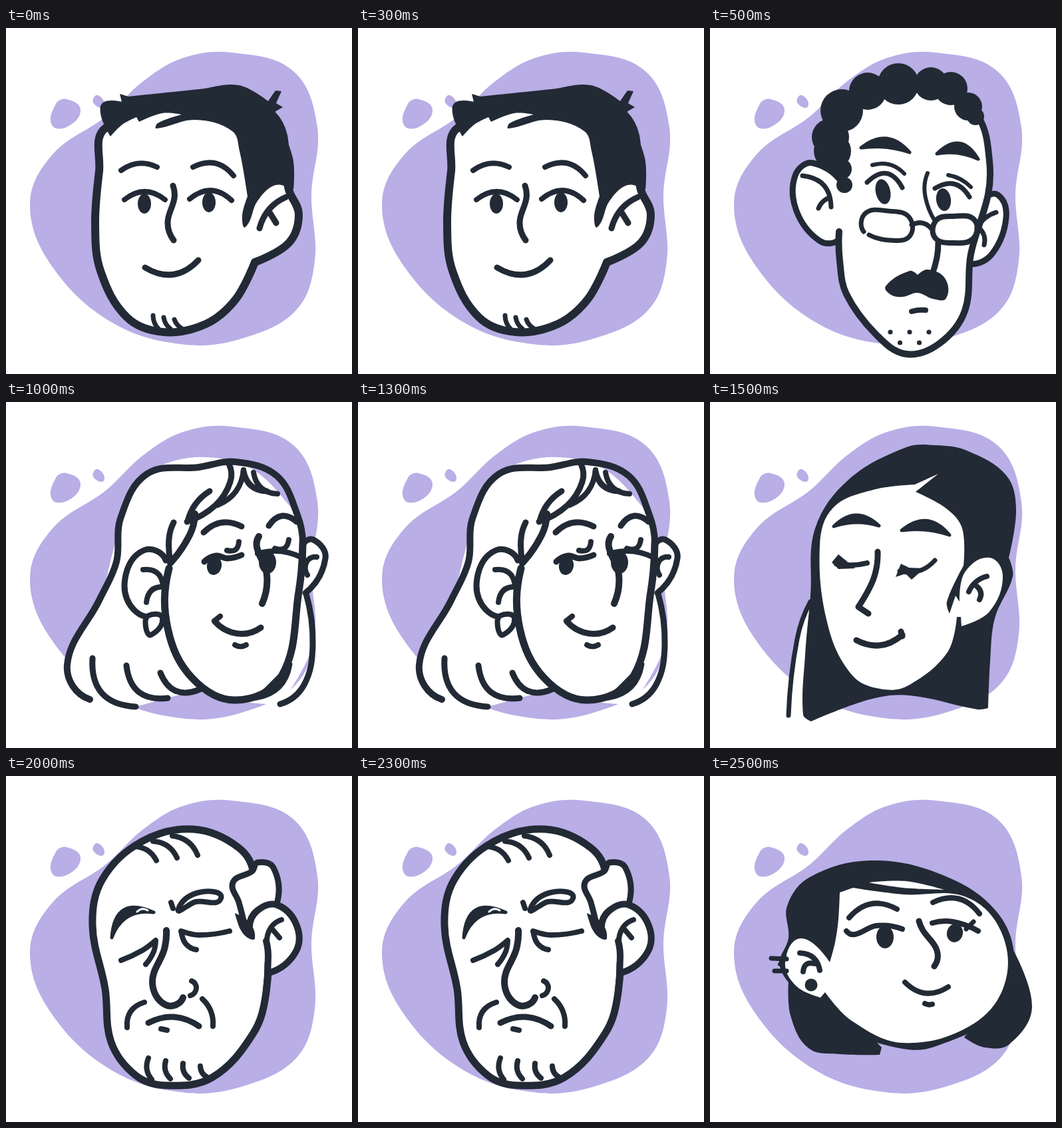
An HTML page for the animation above (3000 ms loop, 520 by 520 pixels).

```html
<!DOCTYPE html>
<html lang="en">
<head>
<meta charset="utf-8">
<title>Faces</title>
<style>
html, body { margin: 0; width: 100%; height: 100%; overflow: hidden; background: #fff; }
svg { display: block; width: 100%; height: 100%; }
</style>
</head>
<body>
<svg id="stage" viewBox="0 0 520 520" stroke-linecap="round" stroke-linejoin="round"></svg>
<script>
const INK = '#222a35', LILAC = '#b9aee6', WHITE = '#fff';
const STEP = 500;

// Smooth curve through key points; "!" marks a sharp corner.
function curve(text, closed) {
  const pts = text.split(' ').map(s => {
    const [x, y] = s.replace('!', '').split(',').map(Number);
    return { x, y, sharp: s.endsWith('!') };
  });
  const n = pts.length;
  const at = i => pts[(i + n) % n];
  const unit = (a, b) => {
    const d = Math.hypot(b.x - a.x, b.y - a.y) || 1;
    return { x: (b.x - a.x) / d, y: (b.y - a.y) / d };
  };
  const inner = i => unit(at(i - 1), at(i + 1));
  // Open ends mirror the neighbour's direction, which makes a round arc.
  const tangent = i => {
    if (pts[i].sharp) return { x: 0, y: 0 };
    if (closed || (i > 0 && i < n - 1)) return inner(i);
    const near = i ? i - 1 : 1, u = unit(at(Math.min(i, near)), at(Math.max(i, near)));
    if (n < 3 || pts[near].sharp) return u;
    const t = inner(near), k = 2 * (u.x * t.x + u.y * t.y);
    return { x: k * u.x - t.x, y: k * u.y - t.y };
  };
  let d = `M${pts[0].x} ${pts[0].y}`;
  for (let i = 0; i < (closed ? n : n - 1); i++) {
    const j = (i + 1) % n, p = pts[i], q = pts[j], s = tangent(i), t = tangent(j);
    const k = Math.hypot(q.x - p.x, q.y - p.y) * 0.36;
    d += `C${p.x + s.x * k} ${p.y + s.y * k} ${q.x - t.x * k} ${q.y - t.y * k} ${q.x} ${q.y}`;
  }
  return d + (closed ? 'Z' : '');
}

const path = (d, fill, width = 0, color = INK) =>
  `<path d="${d}" fill="${fill}" stroke="${width ? color : 'none'}" stroke-width="${width}"/>`;
const fill = (pts, color = INK) => path(curve(pts, true), color);
const line = (w, pts) => path(curve(pts), 'none', w);
const skin = (w, pts) => path(curve(pts), WHITE, w);
const ring = (w, pts) => path(curve(pts, true), WHITE, w);
const oval = (x, y, rx, ry = rx, turn = 0) =>
  `<ellipse cx="${x}" cy="${y}" rx="${rx}" ry="${ry}" transform="rotate(${turn} ${x} ${y})" fill="${INK}"/>`;
const repeat = (n, draw) => Array.from({ length: n }, (_, i) => draw(i)).join('');

// Control point of an arc whose height is bend times its chord.
const knee = (x1, y1, x2, y2, bend) =>
  `${(x1 + x2) / 2 + (y2 - y1) * bend * 2} ${(y1 + y2) / 2 - (x2 - x1) * bend * 2}`;
const arc = (w, x1, y1, x2, y2, bend = 0, color = INK) =>
  path(`M${x1} ${y1}Q${knee(x1, y1, x2, y2, bend)} ${x2} ${y2}`, 'none', w, color);
// Crescent between two arcs.
const brush = (x1, y1, x2, y2, top, low) =>
  path(`M${x1} ${y1}Q${knee(x1, y1, x2, y2, top)} ${x2} ${y2}Q${knee(x1, y1, x2, y2, low)} ${x1} ${y1}Z`, INK, 5);

const backdrop = [
  fill('340,37 432,65 468,150 459,250 464,350 437,423 360,465 270,476 160,443 69,358 36,265 70,190 150,133 205,81 266,45', LILAC),
  fill('91,107 112,123 93,148 69,146 75,114', LILAC),
  fill('138,101 147,118 131,112', LILAC)
];

const shortHair = [
  ring(12, '150,150 140,215 134,295 142,365 182,435 237,457 300,445 345,408 374,352! 425,323 440,280 425,243 400,130 290,110'),
  fill('146,112 143,133 157,163! 175,145 196,134! 200,141! 235,128 264,130! 228,143 226,151 285,138 340,155 351,185 363,253! 355,282 360,299 378,260 405,236 432,243! 431,195 404,126! 416,119! 406,113! 414,95! 405,94! 394,110! 350,86 290,92 184,103! 171,99! 174,111!'),
  arc(9, 421, 254, 381, 301, -0.12), arc(9, 396, 277, 406, 293),
  arc(8, 173, 214, 227, 209, 0.15), arc(8, 281, 209, 342, 222, 0.2),
  arc(8, 178, 258, 239, 258, 0.2), oval(208, 264, 10, 15),
  arc(8, 276, 257, 339, 259, 0.22), oval(305, 262, 10, 15),
  line(9, '251,237 253,256 243,292 252,319'),
  arc(9, 209, 360, 289, 349, -0.2),
  repeat(3, i => arc(7, 221 + 16 * i, 432 + 3 * i, 229 + 18 * i, 452, -0.1))
];

const curls = [
  [202, 236, 12], [197, 212, 16], [184, 185, 28], [181, 164, 28], [198, 124, 32], [237, 95, 28],
  [283, 84, 31], [332, 84, 25], [362, 91, 25], [388, 118, 21], [399, 133, 13]
];

const moustache = [
  skin(9, '412,260 433,251 445,285 425,338 393,355'),
  skin(9, '194,318 165,320 130,275 128,222 155,203 203,240'),
  skin(10, '203,235 190,185 198,124 283,84 362,91 406,138 420,200 418,250 392,340 383,425 345,474 295,490 250,461 205,400 195,350 194,306'),
  curls.map(c => oval(...c)).join(''),
  arc(7, 139, 222, 182, 269, 0.22), arc(7, 163, 271, 177, 256, 0.1),
  brush(227, 180, 300, 187, 0.24, 0.06), brush(341, 189, 403, 197, 0.32, 0.08),
  arc(6, 244, 206, 292, 219, 0.15), arc(7, 236, 232, 289, 240, 0.33),
  arc(6, 358, 221, 392, 239, 0.08), arc(7, 338, 241, 390, 254, 0.25),
  oval(260, 246, 11, 19, -12), oval(351, 258, 11, 17, -8),
  line(6, '327,218 323,250 338,290'), line(9, '343,322 341,345 334,370'),
  line(7, '231,306 234,278 268,275 299,284 300,313 270,319 239,311'),
  ring(8, '340,289 365,283 397,288 396,316 365,323 338,315'),
  arc(7, 303, 296, 333, 302, 0.2),
  arc(7, 401, 301, 430, 277, 0.1), arc(7, 404, 300, 412, 326, 0.15),
  fill('264,388 300,365 312,371! 327,363 353,376 355,406 335,407 312,398 290,404 272,401'),
  arc(8, 303, 426, 324, 424, 0.05),
  repeat(5, i => oval(271 + 14.5 * i, 457 + 16 * (i % 2), 3.6))
];

const longBob = [
  fill('126,447! 93,385 140,298 170,195 212,106 345,90 438,170 445,205! 452,288 461,365 412,455! 345,449 290,432! 195,458!', WHITE),
  skin(9, '446,217 462,207 480,235 450,287'),
  line(10, '126,447 92,395 140,298 166,240 172,175 212,108 290,98 345,90 407,111 438,170 446,212'),
  line(11, '446,212 440,285 414,412 345,448 280,415 243,340 245,250'),
  line(9, '451,288 461,365 448,425 412,454'),
  brush(376, 446, 428, 394, -0.18, 0),
  line(9, '240,238 207,223 179,265 192,312 232,322'),
  arc(8, 206, 252, 236, 277, 0.25), arc(8, 211, 301, 240, 278, 0.25),
  ring(8, '214,321 210,338 218,350 235,325'),
  line(9, '252,181 245,205 247,240'), line(10, '247,242 276,200 284,168'),
  line(9, '272,180 315,155 337,120 335,93'), arc(9, 273, 179, 306, 134, 0.1),
  arc(8, 318, 155, 357, 102, -0.15), arc(9, 357, 104, 392, 134, -0.2), arc(8, 372, 106, 408, 138, -0.2),
  repeat(3, i => arc(9, 130 + 51 * i, 385 + 11 * i, 195 + 48 * i, 458 - 13 * i, -0.25)),
  arc(9, 297, 196, 354, 187, 0.18), arc(9, 395, 186, 437, 180, 0.28),
  line(9, '298,240 316,231 332,235 354,230'), arc(8, 332, 223, 350, 210, -0.3), oval(313, 246, 11, 14, 10),
  arc(8, 378, 228, 445, 234, 0.1), arc(8, 404, 220, 425, 207, -0.3), oval(393, 241, 13, 17),
  line(10, '380,202 377,218 392,260 385,303'),
  line(9, '314,330 348,348 383,339'), arc(8, 322, 322, 313, 329),
  arc(8, 344, 365, 361, 365, -0.15),
  line(8, '453,260 452,240 467,233')
];

const longDark = [
  fill('152,290! 130,355 118,471! 145,471!', WHITE),
  fill('340,65 295,68 208,117 158,190 151,290 143,380 140,470 152,480! 240,447 300,441 402,462 418,460! 421,390 428,325 455,262 449,234! 460,160 445,110 386,73'),
  line(7, '151,300 131,356 118,471'),
  fill('165,215 185,159 245,132 308,124! 343,108! 309,135! 355,160 379,190 381,246! 356,300 360,318! 369,291! 375,300! 383,256 420,234 440,262 420,315 378,337! 377,323! 371,323! 357,376 300,425 262,432 215,412 177,335', WHITE),
  arc(8, 389, 285, 416, 262, 0.12), arc(8, 401, 277, 405, 297, 0.2),
  brush(186, 187, 254, 186, 0.24, 0.08), brush(288, 193, 360, 200, 0.25, 0.06),
  arc(8, 190, 243, 236, 242, -0.06), fill('183,241! 193,229! 204,238! 218,250! 193,251!'),
  arc(7, 285, 254, 338, 238, -0.15), fill('279,263! 287,243! 299,249! 322,250! 303,267! 294,258!'),
  line(9, '252,225 246,265 223,308! 238,318'),
  arc(9, 220, 358, 289, 350, -0.17), arc(9, 287, 345, 289, 352)
];

const elder = [
  skin(11, '372,150 350,108 282,80 205,98 145,155 130,225 149,320 158,400 195,450 240,465 310,453 372,386 391,325 392,250'),
  skin(9, '357,217 350,190 341,160 370,143 378,130 402,138 408,188'),
  skin(10, '395,296 435,265 437,225 408,194 378,202 366,228'),
  line(10, '391,325 394,270 391,248'),
  fill('344,206! 366,220 374,244 363,243 352,230'),
  line(8, '392,250 398,228 414,216'), arc(8, 400, 230, 411, 243),
  repeat(3, i => arc(8, 192 + 29 * i, 106 - 8 * i, 226 + 31 * i, 127 - 4 * i, 0.15)),
  brush(159, 243, 222, 205, 0.36, 0.2), arc(3, 197, 204, 213, 202, 0.2, WHITE),
  ring(8, '259,200 290,175 323,184 285,189'), arc(8, 248, 190, 251, 199),
  line(8, '173,277 205,262 225,247! 222,264 210,283'),
  line(8, '336,233 290,239 263,233! 270,252 286,261'),
  line(10, '241,232 238,260 220,310 240,344 266,333'),
  line(8, '279,308 286,319 277,330'),
  arc(8, 208, 340, 182, 378, -0.2), arc(8, 295, 335, 311, 376, 0.12),
  arc(9, 214, 371, 290, 376, 0.15), arc(8, 233, 380, 242, 382),
  repeat(4, i => arc(8, 214 + 26 * i, 424 + 4 * i, 219 + 28 * i, 456 - i, -0.15))
];

const earSpikes = [
  fill('240,127 345,147 430,203 457,280 425,360 340,406 290,410 200,380 140,332 105,286 118,243 116,195 150,152'),
  fill('118,308! 121,360 148,409 195,418 255,419! 258,408! 190,335!'),
  fill('455,260! 484,347 450,403 413,408 382,393! 440,320!'),
  fill('195,175! 215,168! 290,178 385,182 438,235 442,315 390,376 290,401 213,368 173,325! 166,333! 130,316 113,280 137,244 180,280! 188,250 193,215', WHITE),
  fill('238,160! 295,158 352,171! 290,168', WHITE),
  arc(8, 135, 266, 165, 292, 0.2), arc(8, 140, 294, 157, 282, 0.3), oval(152, 314, 9.5),
  repeat(2, i => arc(7, 92 + 5 * i, 274 + 19 * i, 115, 275 + 18 * i) + arc(6, 105 + 4 * i, 283 + 2 * i, 112, 271 + 24 * i)),
  arc(8, 209, 213, 281, 200, 0.2), arc(8, 335, 190, 405, 207, 0.2),
  line(8, '205,233 218,238 250,225 289,230'), oval(263, 242, 13, 17),
  line(8, '334,221 365,219 403,233'), arc(7, 385, 230, 396, 219), oval(368, 236, 12, 14, 15),
  line(9, '314,218 320,232 341,262 337,286'),
  arc(8, 293, 310, 358, 317, -0.2), arc(8, 323, 342, 334, 343, -0.1)
];

const faces = [shortHair, moustache, longBob, longDark, elder, earSpikes];
const stage = document.getElementById('stage');
stage.innerHTML = backdrop.join('') + faces.map(f => `<g display="none">${f.join('')}</g>`).join('');
const groups = [...stage.querySelectorAll('g')];

function show(ms) {
  const now = Math.floor(ms / STEP) % faces.length;
  groups.forEach((g, i) => g.setAttribute('display', i === now ? 'inline' : 'none'));
}

let start;
function tick(t) {
  start ??= t;
  show(t - start);
  requestAnimationFrame(tick);
}
show(0);
requestAnimationFrame(tick);
</script>
</body>
</html>
```
